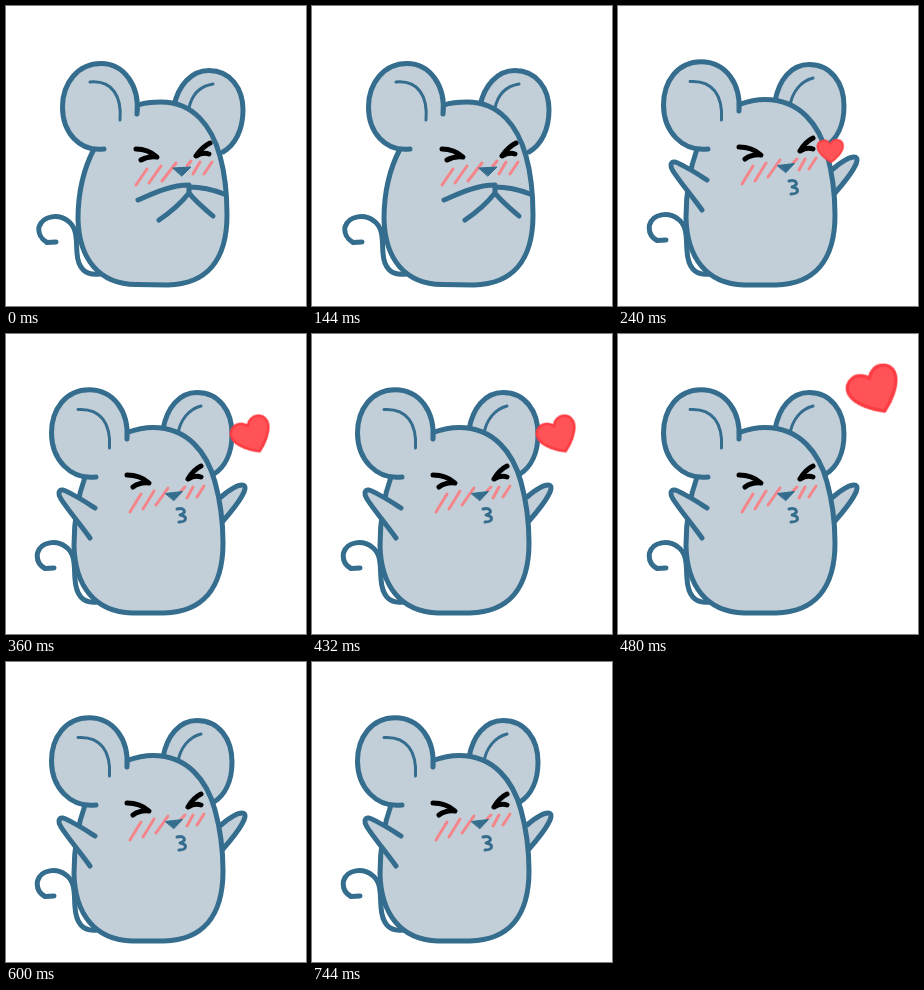
Recreate the animation shown at these times as an HTML page. Size 300 by 300 pixels, loop 840 ms.

```html
<!DOCTYPE html>
<html lang="en">
<head>
<meta charset="utf-8">
<title>Mouse blowing a kiss</title>
<style>
html, body { margin: 0; width: 100%; height: 100%; overflow: hidden; background: #fff; }
svg { display: block; width: 300px; height: 300px; }
path { fill: none; stroke: #346d8d; stroke-width: 5; stroke-linecap: round; stroke-linejoin: round; }
.skin { fill: #c2ced8; }
.thin { stroke-width: 3; }
.eye { stroke: #000; }
.blush { stroke: #f4868b; stroke-width: 3; }
.nose { fill: #346d8d; stroke-width: 1; }
.heart { fill: #ff5357; stroke: #fb3c42; stroke-width: 3.5; }
#kiss, #heart { opacity: 0; }
</style>
</head>
<body>
<svg viewBox="0 0 300 300">
  <g id="shy">
    <path d="M50 236L41 236.500C35 233 32 227 33 221C37 209 53 208 62 215C72 222 70 236 71 247C72 262 79 270 94 268"/>
    <path class="skin" d="M168 100C172 80 185 64.500 203 64.500C224 64.500 237 82 237 104C237 124 229 139 217 146"/>
    <path class="thin" d="M183 102C186 88 195 80 207 78"/>
    <path class="skin" d="M88 143C77 164 72 190 72 213C73 253 93 278 130 278.500L162 279C200 278 221 255 221 209C221 188 219 168 214 150C206 121 188 96 155 96C145 96 138 97 132 99"/>
    <path class="skin" d="M131 108C134 80 118 57.500 95 57.500C72 57.500 56.500 77 56.500 101C56.500 126 73 146 98 143"/>
    <path class="thin" d="M84 76C106 74 116 90 114 114"/>
    <path class="blush" d="M130 179L141 163M143 177L155 160M156 175L170 157M181 160L185 155M187 168L194 156M198 168L206 156"/>
    <path class="eye" d="M130 143Q142 143 151 151Q142 150 135 154M204 137Q196 141 190 150Q197 146 203 148"/>
    <path class="nose" d="M167 162L185 161L176 170Z"/>
    <path d="M132 194C148 187 165 179 183 179L183 187C175 197 165 206 153 214M183 181C195 181 208 184 218 188M183 187C190 196 198 202 207 210"/>
  </g>
  <g id="kiss">
    <path d="M48 234L39 234.500C33 231 30.500 225 31.500 219C35 207 51 206 60 213C70 220 68 234 69 245C70 260 76 270 91 268"/>
    <path class="skin" d="M215 163C222 157 231 151 236 151C241 151 239 157 236 162C231 171 224 179 217 187"/>
    <path class="skin" d="M157 95C161 74 173 58.500 191 58.500C213 58.500 226 77 226 100C226 119 219 133 208 140"/>
    <path class="thin" d="M172 100C174 86 183 75 195 72"/>
    <path class="skin" d="M79 143C71 165 68 190 68 212C69 252 89 278 126 279L158 279C196 278 217 255 217 209C217 188 214 166 209 148C201 119 182 93.500 147 93.500C136 93.500 128 96 121 98.500"/>
    <path class="skin" d="M121 105C123 78 108 55.700 83 55.700C60 55.700 45.500 75 45.500 99C45.500 125 64 146 90 143"/>
    <path class="thin" d="M72 75.500C95 74 105 90 103.500 114"/>
    <path class="skin" d="M89 174C78 167 66 159 57 156C52 155 52 161 55 165C62 176 74 190 84 204"/>
    <path class="blush" d="M124 178L135 160M137 175L148 157M150 171L162 154M175 157L179 153M181 164L187 153M191 163L198 152"/>
    <path class="eye" d="M121 141Q134 141 143 149Q134 148 127 153M195 132Q187 136 182 145Q189 141 195 143"/>
    <path class="nose" d="M159.500 159.500L176.500 157.500L168 166.500Z"/>
    <path class="thin" d="M171 175C178 173 182 179 174 181C182 182 181 188 173 188"/>
  </g>
  <g id="heart">
    <path class="heart" d="M0 24C-8 19 -26 5 -26 -8C-26 -22 -8 -26 0 -13C8 -26 26 -22 26 -8C26 5 8 19 0 24Z"/>
  </g>
</svg>
<script>
const LOOP = 840;
const hide = { opacity: 0 }, show = { opacity: 1 };
const place = (x, y, turn, size) => ({
  opacity: 1,
  transform: `translate(${x}px, ${y}px) rotate(${turn}deg) scale(${size})`
});

// Each pose holds until the next time in its table.
function play(id, steps) {
  const frames = steps.map(([time, pose]) => ({ ...pose, offset: time / LOOP, easing: "step-end" }));
  frames.push({ ...steps[steps.length - 1][1], offset: 1 });
  document.getElementById(id).animate(frames, { duration: LOOP, iterations: Infinity });
}

const flight = [
  [240, place(212.5, 144.5, -3, 0.49)],
  [360, place(246, 101, -25, 0.75)],
  [480, place(256.8, 56, -25, 0.97)]
];
const gone = { ...flight[2][1], opacity: 0 };

play("shy", [[0, show], [240, hide]]);
play("kiss", [[0, hide], [240, show]]);
play("heart", [[0, { ...flight[0][1], opacity: 0 }], ...flight, [600, gone]]);
</script>
</body>
</html>
```
